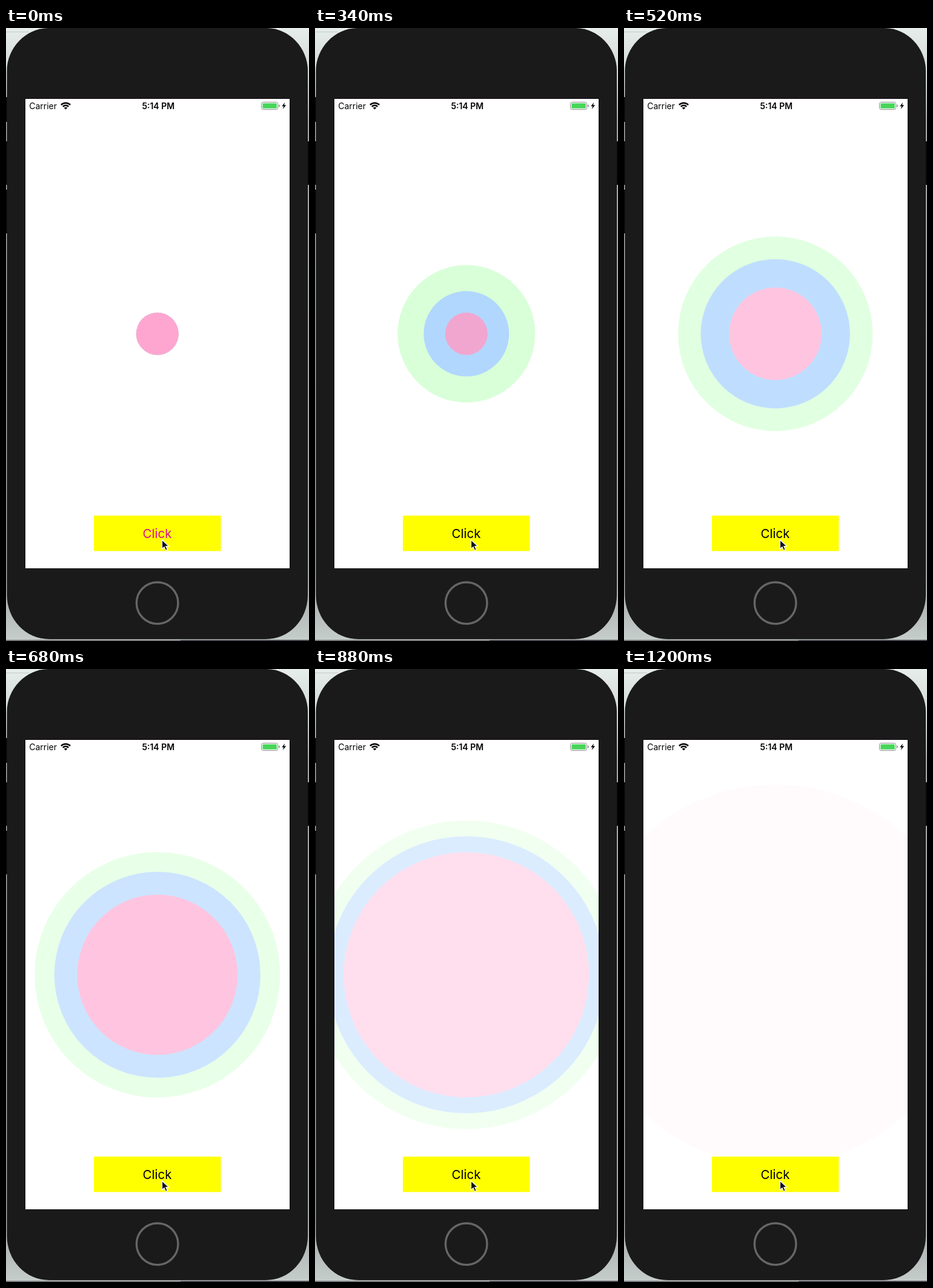
Animation, 500 px wide and 1012 px high, one loop 1240 ms. Source, as an HTML page:

```html
<!DOCTYPE html>
<html lang="en">
<head>
<meta charset="utf-8">
<title>Pulse</title>
<style>
  html, body { margin: 0; width: 100%; height: 100%; overflow: hidden; }
  svg { display: block; width: 100vw; height: 100vh; }
  text { font-family: Inter, Roboto, sans-serif; }
</style>
</head>
<body>
<svg viewBox="0 0 500 1012">
  <defs>
    <linearGradient id="backdrop" x2="0" y2="1">
      <stop offset="0" stop-color="#e6edeb"/>
      <stop offset=".07" stop-color="#d3d9d8"/>
      <stop offset=".15" stop-color="#a6a9a9"/>
      <stop offset=".9" stop-color="#a3a6a6"/>
      <stop offset="1" stop-color="#c6cecc"/>
    </linearGradient>
    <clipPath id="screen"><rect x="32" y="117" width="436" height="775"/></clipPath>
    <clipPath id="wedge"><path d="M98.5 134.5l-13-13h26z"/></clipPath>
  </defs>

  <!-- Desktop and phone -->
  <rect width="500" height="1012" fill="url(#backdrop)"/>
  <path d="M0 6.5H38" stroke="#c4c9c8"/>
  <path d="M0 1011H288" stroke="#77777a" stroke-width="2"/>
  <path d="M288 1011H500" stroke="#4b4850" stroke-width="2"/>
  <path d="M0 114h3v41h-3zM0 187h3v72h-3zM0 267h3v72h-3zM497 187h3v72h-3z" fill="#080808"/>
  <path d="M1.5 70C1.5 34 32 0 70 0H430C468 0 498 34 498 70V936C498 976 468 1009 428 1009H72C32 1009 1.5 976 1.5 936Z" fill="#1a1a1a"/>
  <circle cx="249.7" cy="949.3" r="34.3" fill="none" stroke="#666" stroke-width="3.4"/>
  <rect x="31.5" y="116" width="437" height="776.5" fill="#120812"/>
  <rect x="32" y="117" width="436" height="775" fill="#fff"/>

  <g clip-path="url(#screen)">
    <g id="discs"></g>
  </g>

  <!-- Status bar -->
  <text x="38.2" y="133.5" font-size="14">Carrier</text>
  <g clip-path="url(#wedge)" fill="none" stroke="#000" stroke-width="2.5">
    <circle cx="98.5" cy="134.5" r="10.7"/>
    <circle cx="98.5" cy="134.5" r="6.7"/>
    <circle cx="98.5" cy="134.5" r="1.9" stroke-width="3.8"/>
  </g>
  <text x="251.3" y="133.5" font-size="14" font-weight="600" text-anchor="middle">5:14 PM</text>
  <rect x="421.6" y="122.4" width="27" height="12.2" rx="3" fill="#fff" stroke="#8a8a8a"/>
  <rect x="423.4" y="124.2" width="23.4" height="8.6" rx="1.5" fill="#47d65a"/>
  <path d="M450.2 126.3q1.8.6 1.8 2.2t-1.8 2.2z" fill="#8a8a8a"/>
  <path d="M460.2 122.8l-5 6.4h3l-1.6 4.9 5.6-6.9h-3.3z"/>

  <!-- Button and pointer -->
  <rect x="145" y="805" width="209.5" height="58.5" fill="#ff0"/>
  <text id="label" x="249.5" y="842" font-size="20.5" text-anchor="middle">Click</text>
  <path d="M257.5 845v15l3.5-3.3 2.5 5.7 2.8-1.2-2.4-5.6h4.7z" fill="#111" stroke="#fff" stroke-width="1.2"/>
</svg>
<script>
const LOOP = 1240, STEP = 20, R0 = 35, R1 = 315;
const discs = document.getElementById("discs");
const label = document.getElementById("label");

function addDisc() {
  const c = document.createElementNS("http://www.w3.org/2000/svg", "circle");
  c.setAttribute("cx", 249.8);
  c.setAttribute("cy", 504.8);
  return discs.appendChild(c);
}
const [green, blue, pink] = [addDisc(), addDisc(), addDisc()];

const clamp = x => Math.min(1, Math.max(0, x));
const ramp = (t, t0, t1, a, b) => a + (b - a) * clamp((t - t0) / (t1 - t0));
const radius = (t, t0, t1) => ramp(t, t0, t1, R0, R1);

function paint(disc, r, red, g, b, shown = true) {
  disc.setAttribute("r", shown ? r : 0);
  disc.setAttribute("fill", `rgb(${[red, g, b].map(Math.round)})`);
}

function pinkTint(t) {
  if (t < 500) return ramp(t, 402, 500, 89, 58);
  return t < 780 ? ramp(t, 680, 780, 58, 41) : ramp(t, 780, 1200, 41, 4);
}

function draw(t) {
  const g = ramp(t, 40, 1210, 51, 0);
  paint(green, radius(t, 40, 1110), 255 - g, 255, 255 - g, t < 1110);

  const b = ramp(t, 219, 1345, 87, 0);
  paint(blue, radius(t, 219, 1175), 255 - b, 255 - b * .52, 255, t < 1175);

  const p = pinkTint(t);
  const muted = t >= 220 && t < 400;
  paint(pink, radius(t, 402, 1202), muted ? 241 : 255, 255 - p, 255 - p * .53);

  label.setAttribute("fill", t < 40 ? "#d9138f" : "#000");
}

const start = performance.now();
function tick() {
  const t = (performance.now() - start) % LOOP;
  draw(Math.floor(t / STEP) * STEP);
  requestAnimationFrame(tick);
}
tick();
</script>
</body>
</html>
```
